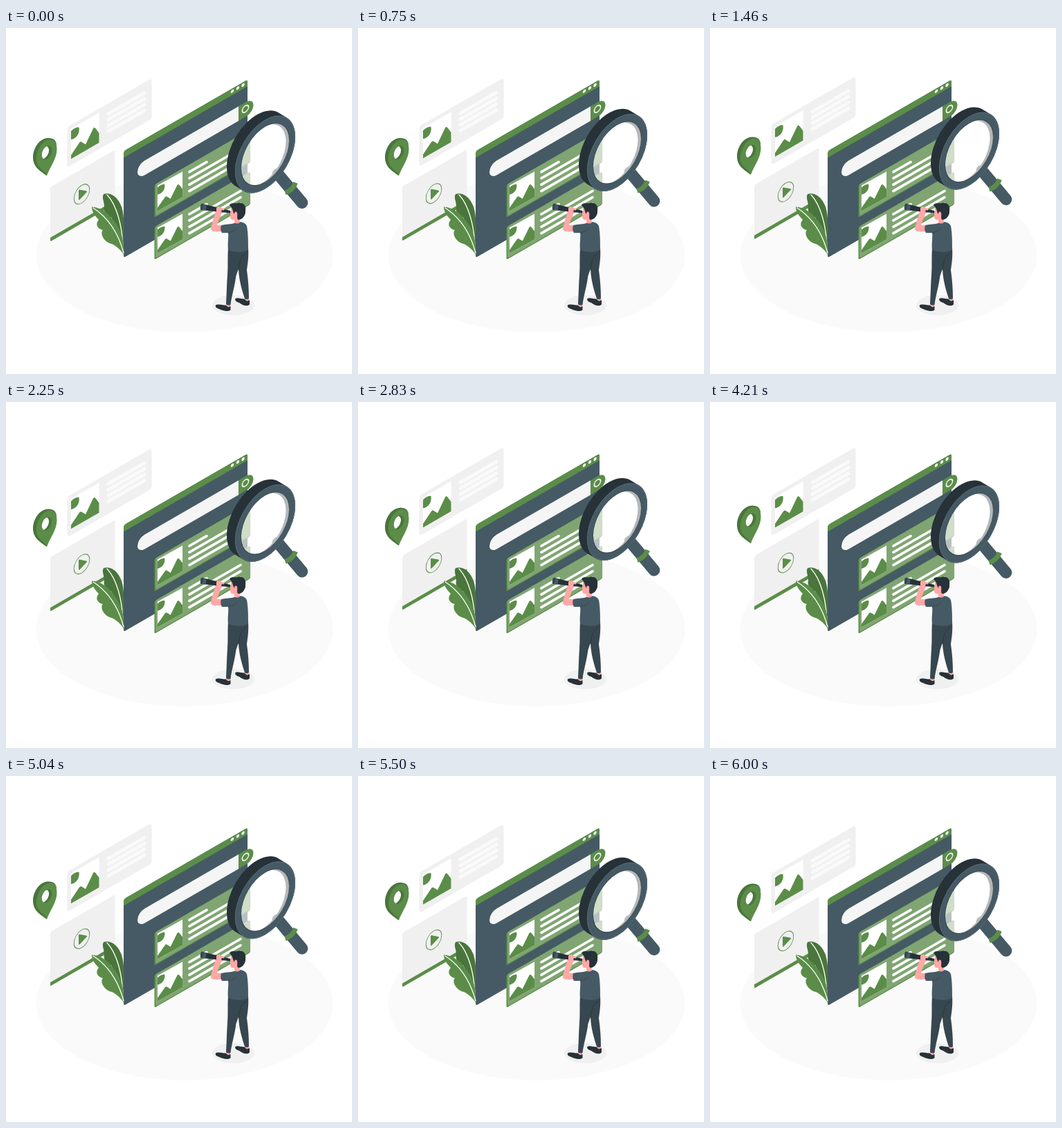
Animation, 500 px wide and 500 px high, one loop 6040 ms. Source, as an HTML page:

```html
<!DOCTYPE html>
<html lang="en">
<head>
<meta charset="utf-8">
<title>Search illustration</title>
<style>
  html, body { margin: 0; width: 100%; height: 100%; overflow: hidden; background: #fff; }
  svg { display: block; width: 100vw; height: 100vh; }
  .green { fill: #5b8d49; }
  .moss { fill: #4a753c; }
  .slate { fill: #455a64; }
  .ink { fill: #263238; }
  .pants { fill: #37474f; }
  .skin { fill: #ffa8a7; }
  .pale { fill: #f0f0f0; }
  .white { fill: #fff; }
  .line { fill: none; stroke: #fff; stroke-linecap: round; }
</style>
</head>
<body>
<svg viewBox="0 0 500 500">
  <defs>
    <clipPath id="glassClip"><circle r="35"/></clipPath>
    <clipPath id="holeClip"><ellipse cx="59" cy="180" rx="6.5" ry="10.3" transform="rotate(24 59 180)"/></clipPath>
    <g id="photo">
      <path class="white" d="M0 0L40.5-23.4V20.1L0 43.5Z"/>
      <path class="green" d="M0 3.500C3 0 8-3 11.500-2C13 6 8 14 0 15.500Z"/>
      <path class="green" d="M0 43.500V38L12 20Q14 17.500 16 19.500L21 22.500L32-.5Q33.500-3 35.500-.5L40.500 6V20.100Z"/>
    </g>
    <g id="result">
      <g transform="matrix(1 -.577 0 1 214.500 226.500)">
        <rect class="green" width="138.500" height="47.500" rx="2.500"/>
        <rect x="1.600" width="137" height="46" rx="2.500" fill="#80a572"/>
      </g>
      <use href="#photo" transform="translate(219 227.500) scale(.89 .85)"/>
      <g class="line" id="resultLines" stroke-width="3.700"></g>
    </g>
  </defs>

  <ellipse cx="258" cy="328" rx="214.500" ry="112" fill="#fafafa"/>

  <g id="imageCard">
    <rect class="pale" width="122" height="58.500" rx="4" transform="matrix(1 -.577 0 1 88.500 143)"/>
    <use href="#photo" x="94" y="145.700"/>
    <g class="line" id="cardLines" stroke-width="5" style="stroke:#fafafa"></g>
  </g>

  <g id="videoCard">
    <g transform="matrix(1 -.577 0 1 64 230)">
      <path class="pale" d="M0 73V2.500Q0 0 2.500 0H91Q93.500 0 93.500 2.500V73Z"/>
      <path class="green" d="M0 73H93.500V78.500H1.500Q0 78.500 0 76.500Z"/>
      <ellipse cx="45.500" cy="36.300" rx="11.300" ry="12.800" fill="none" stroke="#5b8d49" stroke-width=".9"/>
    </g>
    <path class="green" d="M105 235Q105 233.500 106.500 233.700L116.500 235.500Q117.500 236 116.800 237L106.500 248Q105 249.200 105 247.500Z"/>
  </g>

  <g id="pin">
    <path class="moss" d="M58.500 213.500C53 208 39 203 39 187C39 174 48 160 60 159C67 158.500 72 161 73 168L63 200Z"/>
    <path class="green" d="M59 213.500C57 205 44 204 44 189.500C44 176 53 161.500 63.500 161C70.500 161 73.500 167 73.500 175C73.500 189 64 200 59 213.500Z"/>
    <g clip-path="url(#holeClip)">
      <path class="moss" d="M45 165H73V195H45Z"/>
      <ellipse class="white" cx="55.500" cy="180" rx="5.700" ry="9.600" transform="rotate(24 55.500 180)"/>
    </g>
  </g>

  <g transform="matrix(1 -.577 0 1 170 178)">
    <rect class="slate" width="179" height="154" rx="3"/>
    <path class="green" d="M0 9.500V3Q0 0 3 0H176Q179 0 179 3V9.500Z"/>
    <path d="M166 31V52H30.500A10.500 10.500 0 0 1 30.500 31Z" fill="#f5f5f5"/>
    <path class="green" d="M166 31H177A10.500 10.500 0 0 1 177 52H166Z"/>
    <g class="white">
      <circle cx="157" cy="4" r="2.200"/><circle cx="165" cy="4" r="2.200"/><circle cx="172.500" cy="4" r="2.200"/>
    </g>
    <circle cx="176" cy="40.500" r="4.600" fill="none" stroke="#fff" stroke-width="1.500"/>
  </g>
  <use href="#result"/>
  <use href="#result" y="61"/>

  <path class="moss" d="M169.500 322C170 300 173 268 165 254C160 243 150 237 141 240C138 246 142 250 142 258C140 266 146 272 153 274C153 284 157 291 164 294C167 300 168 310 169.500 322Z"/>
  <path class="line" d="M146 241C160 256 168 285 169 318" stroke-width="1.300"/>
  <path class="green" d="M170.500 328C171 308 167 293 157 280C149 268 137 259 124 258.500C124 265 128 271 134 277C129 283 131 290 140 292C135 297 142 310 153 312C161 316 166 321 170.500 328Z"/>
  <path class="line" d="M126 260C146 273 162 295 170 325" stroke-width="1.300"/>

  <g id="lens">
    <path d="M393 211L427.800 252.500" fill="none" stroke="#455a64" stroke-width="17" stroke-linecap="round"/>
    <path d="M403.500 238Q414 235 418.500 223.500" fill="none" stroke="#5b8d49" stroke-width="7"/>
    <g transform="matrix(1 -.577 0 1.150 374.500 182.500)">
      <path class="ink" fill-rule="evenodd" d="M31.500-30L19.500-42.300A43.500 43.500 0 0 0-43.500 17.700L-31.500 30A43.500 43.500 0 0 0 31.500-30ZM35 0A35 35 0 1 1-35 0A35 35 0 1 1 35 0Z"/>
      <circle r="39.200" fill="none" stroke="#455a64" stroke-width="8.500"/>
      <circle r="43.100" fill="none" stroke="#5f727c" stroke-width=".6"/>
      <g clip-path="url(#glassClip)">
        <circle r="35" fill="#fff" opacity=".62"/>
        <path fill="#b4b7b9" fill-rule="evenodd" d="M-42-42H42V42H-42ZM30-1A35 35 0 1 0-40-1A35 35 0 1 0 30-1Z"/>
      </g>
      <circle r="34.900" fill="none" stroke="#37474f" stroke-width=".8"/>
    </g>
  </g>

  <ellipse class="pale" cx="328.500" cy="400.500" rx="30.500" ry="14.500"/>
  <g>
    <path class="skin" d="M318 397H324.500L324 405H318ZM345 389H351V397H345Z"/>
    <path class="ink" d="M303 400.500C307 398 314 401 318 400.500C320 404.500 323 403 324.500 402V407.500C320 410.500 313 408.500 308 406C304 405 302 403 303 400.500Z"/>
    <path class="ink" d="M331.500 391C335 389 341 392 345 391.500C347 396 350 394.500 352 393V399.500C348 403.500 341 400 337 397C333 396 330 393.500 331.500 391Z"/>
    <path class="pants" d="M321 318H350C351 332 349 342 348 350C350 364 351 377 351 391Q348 393 345 391C341 379 336.500 364 336 348L332.500 358C330.500 374 326 387 324.500 400Q321 401.500 318 399C319 382 319 370 320 357C321 344 320 330 321 318Z"/>
    <path d="M348 325C340 329 337 336 336 350" fill="none" stroke="#263238" stroke-width=".8"/>
    <path class="skin" d="M312 285L305 285C307 279 310 271 312 267C316 264 313 261 309 260C306 257 303 259 303 264C301 273 297 283 296 290C296 295 303 294 313 294Z"/>
    <path class="slate" d="M311 285C319 283 325 284 330 282C338 278 346 281 348 286C350 297 350 310 350 320C344 325 328 325 321 320C320 311 322 302 321 296L312 296Q309 291 311 285Z"/>
    <path d="M321 296C326 295 331 293 333 290" fill="none" stroke="#37474f"/>
    <path class="skin" d="M325 260L337 262L338 281Q334 284 330 281L330 277C325 278 323.500 275 324 270Z"/>
    <path class="ink" d="M323 256C325 251.500 331 254 335 253C343 251 347.500 257 346 264C347 270 341 278 335.500 277C333 275 335 271 334 267C332 264 330 266 330 269C327 265 329 262 323 256Z"/>
    <path class="ink" d="M288 255L306 259.500L324 264V267.500L306 265.500L288 263.500Z"/>
    <path class="slate" d="M283 253.500L290 255.500L288.500 264L282 263Q279.500 258 283 253.500Z"/>
    <ellipse class="pants" cx="283" cy="258.300" rx="2" ry="4.700" transform="rotate(9 283 258)"/>
    <path class="skin" d="M304 260C306 257 311 258 312 261L311 268Q307 270 304 266Z"/>
    <path class="skin" d="M311 260L316 261L315 263.500L311 263Z"/>
  </g>
</svg>
<script>
  const LOOP = 6040;
  const PERIOD = 6000;
  const RISE = 10;
  const SLOPE = 0.577;
  const byId = id => document.getElementById(id);

  const slantedLines = (x, y, step, ends) => ends.map((end, i) =>
    `<path d="M${x} ${y + i * step}L${end} ${y + i * step - (end - x) * SLOPE}"/>`).join("");

  byId("cardLines").innerHTML = slantedLines(148, 124, 8.4, [200, 200, 200, 200]);
  byId("resultLines").innerHTML = slantedLines(265, 208, 9.2, [290, 339, 339, 339]);

  const floaters = [["lens", 0], ["imageCard", 500], ["videoCard", 500], ["pin", 1000]]
    .map(([id, delay]) => ({ node: byId(id), delay }));

  // Linear rise and fall, resting until the delay has passed.
  function lift(time, delay) {
    const phase = Math.max(0, time - delay) / PERIOD % 1;
    return -RISE * (1 - Math.abs(1 - 2 * phase));
  }

  function render(time) {
    for (const { node, delay } of floaters)
      node.setAttribute("transform", `translate(0 ${lift(time, delay).toFixed(3)})`);
  }

  const start = performance.now();
  function tick() {
    render((performance.now() - start) % LOOP);
    requestAnimationFrame(tick);
  }
  tick();
</script>
</body>
</html>
```
